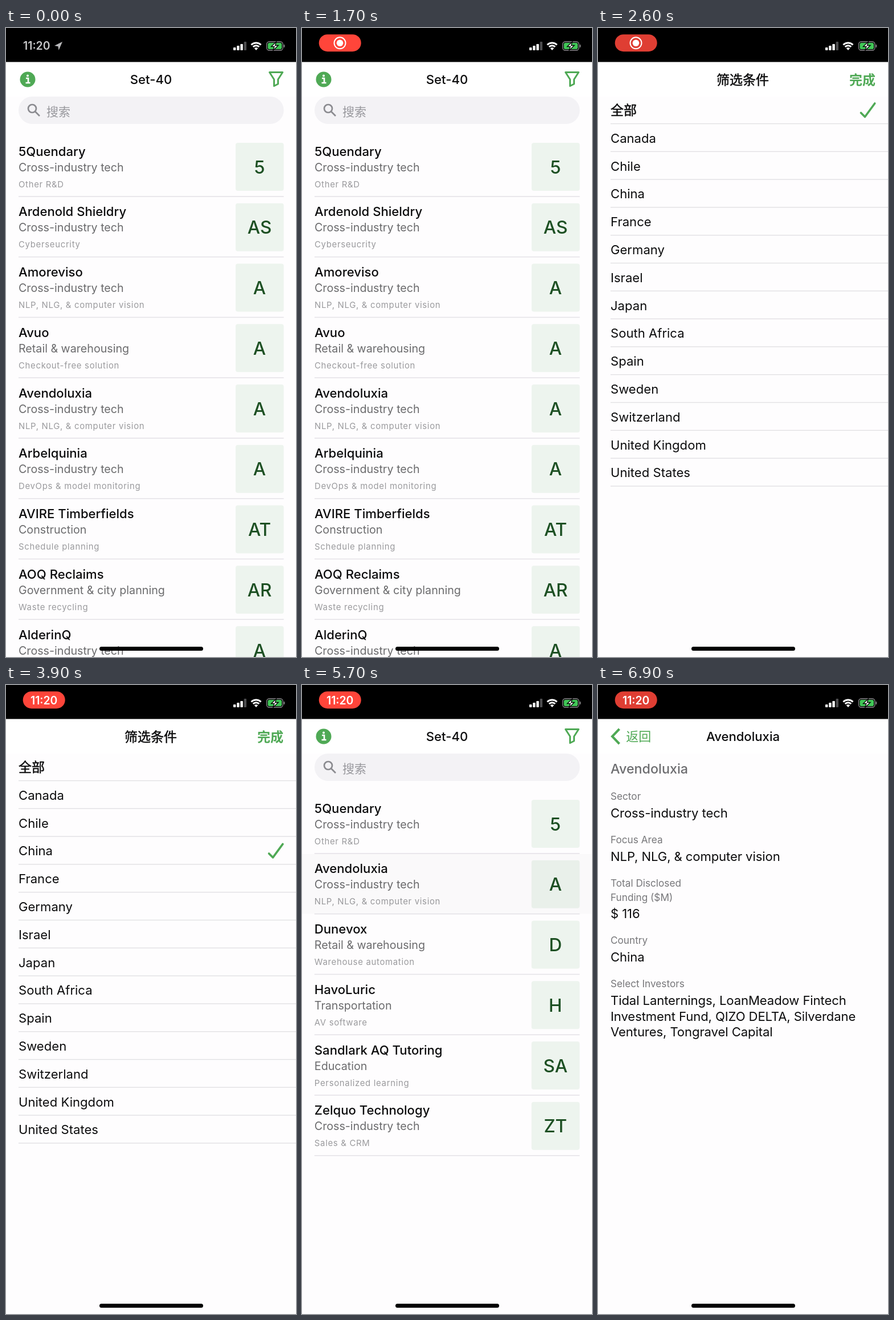
An HTML page that plays this animation: 509 by 1101 pixels, repeating every 7000 ms.

```html
<!DOCTYPE html>
<html lang="zh-CN">
<head>
<meta charset="utf-8">
<title>Company list</title>
<style>
  html, body { margin: 0; width: 100%; height: 100%; overflow: hidden; background: #fefdfe; }
  svg { display: block; width: 509px; height: 1101px; overflow: hidden; }
  text { font-family: Inter, "Noto Sans CJK SC", "Noto Sans CJK", sans-serif; fill: #0c0c0d; font-size: 22.1px; }
  .name, .title { font-weight: 500; }
  .sub { font-size: 19.66px; fill: #6b6b6d; }
  .note { font-size: 14.9px; letter-spacing: .7px; fill: #9a9a9d; }
  .badge { font-size: 31.5px; font-weight: 500; fill: #1d5023; }
  .heading { font-size: 23.3px; font-weight: 500; fill: #6d6d70; }
  .label { font-size: 17.2px; fill: #77777a; }
  .value { letter-spacing: -.1px; }
  .cjk { font-size: 23px; font-weight: 500; stroke: #0c0c0d; stroke-width: .5px; }
  .done { font-size: 23px; font-weight: 700; text-anchor: end; }
  .back { font-size: 22px; }
  .hint { font-size: 21px; fill: #98989d; }
  .clock { font-size: 19.4px; font-weight: 600; fill: #fff; }
  .idle { fill: #c9c9ca; }
  .mid { text-anchor: middle; }
  .green { fill: #4fa955; }
  .stroke { fill: none; stroke: #4fa955; stroke-linecap: round; stroke-linejoin: round; }
  .sharp { stroke-linecap: butt; stroke-linejoin: miter; }
</style>
</head>
<body>
<svg id="stage" viewBox="0 0 509 1101"></svg>
<script>
const W = 509, H = 1101, TOP = 120, LOOP = 7000, STEP = 100;
const BG = '#fefdfe', TECH = 'Cross-industry tech', VISION = 'NLP, NLG, & computer vision';
const PICKED = ['Avendoluxia', TECH, VISION, 'A'];
const FIRST = ['5Quendary', TECH, 'Other R&D', '5'];

const allFirms = [
  FIRST,
  ['Ardenold Shieldry', TECH, 'Cyberseucrity', 'AS'],
  ['Amoreviso', TECH, VISION, 'A'],
  ['Avuo', 'Retail & warehousing', 'Checkout-free solution', 'A'],
  PICKED,
  ['Arbelquinia', TECH, 'DevOps & model monitoring', 'A'],
  ['AVIRE Timberfields', 'Construction', 'Schedule planning', 'AT'],
  ['AOQ Reclaims', 'Government & city planning', 'Waste recycling', 'AR'],
  ['AlderinQ', TECH, '', 'A']
];
const chinaFirms = [
  FIRST,
  PICKED,
  ['Dunevox', 'Retail & warehousing', 'Warehouse automation', 'D'],
  ['HavoLuric', 'Transportation', 'AV software', 'H'],
  ['Sandlark AQ Tutoring', 'Education', 'Personalized learning', 'SA'],
  ['Zelquo Technology', TECH, 'Sales & CRM', 'ZT']
];
const filters = ['全部', 'Canada', 'Chile', 'China', 'France', 'Germany', 'Israel', 'Japan',
  'South Africa', 'Spain', 'Sweden', 'Switzerland', 'United Kingdom', 'United States'];
const details = [
  ['heading', 154.5, PICKED[0]],
  ['label', 201, 'Sector'], ['value', 232, TECH],
  ['label', 277, 'Focus Area'], ['value', 308, VISION],
  ['label', 353, 'Total Disclosed'], ['label', 377.5, 'Funding ($M)'], ['value', 408, '$ 116'],
  ['label', 453, 'Country'], ['value', 484, 'China'],
  ['label', 529, 'Select Investors'],
  ['value', 560, 'Tidal Lanternings, LoanMeadow Fintech'],
  ['value', 587.5, 'Investment Fund, QIZO DELTA, Silverdane'],
  ['value', 614.5, 'Ventures, Tongravel Capital']
];

const text = (x, y, cls, str) => `<text x="${x}" y="${y}" class="${cls}">${str.replace(/&/g, '&amp;')}</text>`;
const rect = (x, y, w, h, fill, r = 0, more = '') =>
  `<rect x="${x}" y="${y}" width="${w}" height="${h}" rx="${r}" fill="${fill}" ${more}/>`;
const group = (id, body) => `<g id="${id}">${body}</g>`;
const page = () => rect(0, TOP, W, H - TOP, BG);

const firmRow = ([name, sub, note, badge], i) => {
  const y = 105.75 * i;
  return text(22, y + 223.5, 'name', name) + text(22, y + 250.7, 'sub', sub) +
    text(22, y + 278.7, 'note', note) + rect(403, y + 201, 84.5, 84, '#edf4ee', 4) +
    text(445, y + 254.7, 'badge mid', badge) + rect(22, y + 294.2, 465.5, 1.5, '#e4e2e7');
};

const filterRow = (name, i) => {
  const y = 48.8 * i;
  return text(22, y + 152, i ? '' : 'cjk', name) + rect(22, y + 166.8, W - 22, 1.4, '#e2e1e4');
};

const searchBar = rect(22, 120, 465.5, 48, '#f3f2f5', 24) +
  '<path d="M51.2 146.2 59 154M53 141a7 7 0 1 1-14 0 7 7 0 1 1 14 0z" fill="none" stroke="#8b8b90" stroke-width="2.7"/>' +
  text(71, 153.5, 'hint', '搜索');

const listHead = '<circle cx="38" cy="90" r="13.5" class="green"/>' +
  '<path d="M35 88h4v8m-4.5 0h8" fill="none" stroke="#fff" stroke-width="2.6"/><circle cx="38" cy="83.5" r="2" fill="#fff"/>' +
  text(254.5, 98, 'title mid', 'Set-40') +
  '<path class="stroke" stroke-width="3" d="M462.5 77.5H485.5L477.5 90V98L470.5 101.5V90Z"/>' + searchBar;

const filterHead = text(254, 98.5, 'cjk mid', '筛选条件') + text(487, 98.5, 'done green', '完成');

const detailHead = '<path class="stroke sharp" stroke-width="4" d="M37.5 77 25 90 37.5 103"/>' +
  text(49.3, 98, 'back green', '返回') + text(254.5, 98, 'title mid', PICKED[0]);

const signal = [34, 31, 28, 24].map((y, i) =>
  rect(399 + 6.2 * i, y, 4.4, 39 - y, i < 3 ? '#fff' : '#4d4d4f', 1)).join('');
const wifi = '<path d="M430.5 29.5A12 12 0 0 1 447.5 29.5M433.7 33A7.5 7.5 0 0 1 444.3 33" fill="none" stroke="#fff" stroke-width="3"/>' +
  '<path d="M439 39 435.8 35.6A4.5 4.5 0 0 1 442.2 35.6Z" fill="#fff"/>';
const battery = rect(457.5, 24, 28.5, 15, 'none', 4.5, 'stroke="#8c8c8e" stroke-width="1.3"') +
  rect(459.5, 26, 24.5, 11, '#42c758', 2.8) + rect(487.5, 29, 1.8, 5, '#8c8c8e', 1) +
  '<path d="M474.5 24 465.5 32.5H471L468.5 39.5 478 30.5H472.5Z" fill="#fff" stroke="#000" stroke-width="1.3"/>';

const statusBar = rect(0, 0, W, 59.5, '#000') +
  group('idleClock', text(30, 38.3, 'clock idle', '11:20') +
    '<path d="M99 24 85 31 91.5 32.2 92.5 39Z" fill="#b9b9bb"/>') +
  group('pill', rect(29.7, 11.2, 74, 30, '#ff453a', 15, 'id="pillShape"') +
    group('recordIcon', '<circle cx="66.5" cy="26.3" r="10" fill="none" stroke="#fff" stroke-width="2"/><circle cx="66.5" cy="26.3" r="5.8" fill="#fff"/>') +
    group('pillClock', text(66.7, 33.5, 'clock mid', '11:20'))) +
  signal + wifi + battery;

document.getElementById('stage').innerHTML = rect(0, 0, W, H, BG) +
  group('list', page() +
    group('allRows', allFirms.map(firmRow).join('')) +
    group('chinaRows', chinaFirms.map(firmRow).join('')) +
    rect(0, 295.7, W, 105, '#201020', 0, 'id="press"')) +
  rect(0, TOP, W, H - TOP, '#000', 0, 'id="shade"') +
  group('sheet', page() + filters.map(filterRow).join('') +
    '<path id="check" class="stroke" stroke-width="3.6" d="M461.5 148.5 468.5 155.5 485.8 132"/>') +
  group('card', page() + details.map(([cls, y, str]) => text(22, y, cls, str)).join('')) +
  rect(0, 59, W, TOP - 59, '#fff') +
  group('listHead', listHead) + group('filterHead', filterHead) + group('detailHead', detailHead) +
  statusBar + rect(164, 1083, 182, 7, '#000', 3.5);

const ui = Object.fromEntries([...document.querySelectorAll('[id]')].map(el => [el.id, el]));
const clamp = v => Math.min(1, Math.max(0, v));
const move = (el, x, y) => el.setAttribute('transform', `translate(${x.toFixed(2)} ${y.toFixed(2)})`);
const fade = (el, v) => el.setAttribute('opacity', v.toFixed(3));
const mix = (a, b, k) => Math.round(a + (b - a) * k);

// Critically damped spring: stiffness 1000, mass 3
function spring(ms) {
  const x = Math.max(0, ms) / 1000 * Math.sqrt(1000 / 3);
  return 1 - (1 + x) * Math.exp(-x);
}

function render(t) {
  const sheet = spring(t - 1800) - spring(t - 4407);
  const detail = spring(t - 5697);
  const filterFade = clamp((sheet - .2) / .6), detailFade = clamp((detail - .2) / .6);

  move(ui.sheet, 0, H * (1 - sheet));
  move(ui.card, W * (1 - detail), 0);
  move(ui.list, -.25 * W * detail, 0);
  fade(ui.shade, .187 * detail);
  fade(ui.press, .015 * clamp(1 - Math.abs(t - 5700) / 200));
  fade(ui.filterHead, filterFade);
  fade(ui.detailHead, detailFade);
  fade(ui.listHead, 1 - Math.max(filterFade, detailFade));

  const china = t >= 3700;
  fade(ui.allRows, china ? 0 : 1);
  fade(ui.chinaRows, china ? 1 : 0);
  move(ui.check, 0, china ? 48.8 * 3 : 0);

  const recording = clamp((t - 300) / 200);
  const glow = .5 + .5 * Math.cos((t - 1750) / 1000 * Math.PI);
  fade(ui.pill, recording);
  fade(ui.idleClock, 1 - recording);
  fade(ui.recordIcon, t < 3500 ? 1 : 0);
  fade(ui.pillClock, t < 3500 ? 0 : 1);
  ui.pillShape.setAttribute('fill', `rgb(${mix(221, 255, glow)},${mix(62, 69, glow)},${mix(51, 58, glow)})`);
}

const start = performance.now();
function tick() {
  const t = (performance.now() - start + 10) % LOOP;
  render(Math.floor(t / STEP) * STEP);
  requestAnimationFrame(tick);
}
tick();
</script>
</body>
</html>
```
